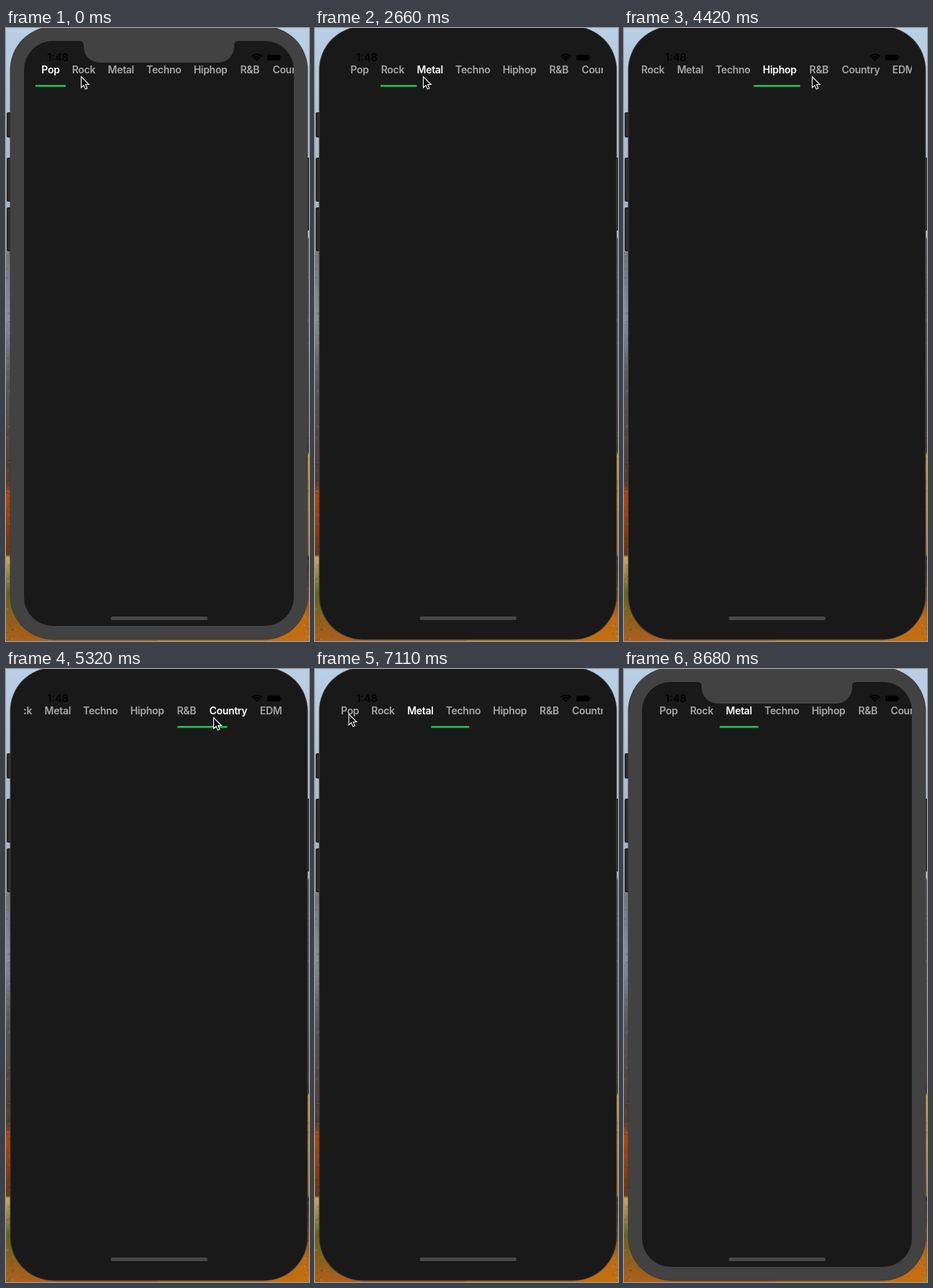
Recreate the animation shown at these times as an HTML page with a canvas. Size 421 by 851 pixels, loop 8.78 s.

```html
<!DOCTYPE html>
<html lang="en">
<head>
<meta charset="utf-8">
<title>Scrolling tab bar</title>
<style>
  html, body { margin: 0; width: 100%; height: 100%; overflow: hidden; background: #191919; }
  canvas { display: block; width: 421px; height: 851px; }
</style>
</head>
<body>
<canvas id="stage" width="421" height="851"></canvas>
<script>
const W = 421, H = 851, LOOP = 8780;
const ctx = document.getElementById('stage').getContext('2d');
const DARK = '#191919', BEZEL = '#424242';
const LEFT = 25, RIGHT = 400, MIDDLE = (LEFT + RIGHT) / 2, MARGIN = 16;
const GLIDE = 260;

const labels = ['Pop', 'Rock', 'Metal', 'Techno', 'Hiphop', 'R&B', 'Country', 'EDM'];
const widths = [42, 49.8, 53.9, 65.1, 64.6, 44.8, 71.2, 47.2];

let edge = LEFT + MARGIN;
const tabs = labels.map((label, i) => {
  const tab = { label, x: edge, w: widths[i], mid: edge + widths[i] / 2 };
  edge += widths[i];
  return tab;
});
const maxScroll = edge + MARGIN - RIGHT;

// The pointer reaches x, rests, then taps the tab.
const visits = [
  { tab: 1, x: 104, reach: 0, tap: 1560 },
  { tab: 2, x: 150, reach: 2340, tap: 2620 },
  { tab: 3, x: 216, reach: 3230, tap: 3522 },
  { tab: 4, x: 261, reach: 3680, tap: 4180 },
  { tab: 6, x: 288, reach: 5160, tap: 5205 },
  { tab: 7, x: 352, reach: 5750, tap: 6030 },
  { tab: 2, x: 46.5, y: 62, reach: 6640, tap: 6915 }
];
const exit = { x: 480, y: 900, reach: 7820 };

const lerp = (a, b, p) => a + (b - a) * p;
const clamp = (v, lo, hi) => Math.min(hi, Math.max(lo, v));
const smooth = p => p * p * (3 - 2 * p);

const sample = clock => Math.max(0, Math.floor((clock + 20) / 148) * 148 - 20);

// Overdamped spring from 0 to 1
function spring(ms) {
  const s = ms / 1000, slow = 12.5, fast = 93.5;
  const p = 1 - (fast * Math.exp(-slow * s) - slow * Math.exp(-fast * s)) / (fast - slow);
  return p > 0.996 ? 1 : p;
}

function tabState(t) {
  let active = tabs[0], { x, w } = active, scroll = 0;
  for (const visit of visits) {
    if (t < visit.tap) break;
    const p = spring(t - visit.tap);
    active = tabs[visit.tab];
    x = lerp(x, active.x, p);
    w = lerp(w, active.w, p);
    scroll = lerp(scroll, clamp(active.mid - MIDDLE, 0, maxScroll), p);
  }
  return { active, x, w, scroll };
}

function pointerAt(t) {
  let { x } = visits[0], y = 67;
  for (const stop of [...visits, exit]) {
    const p = smooth(clamp((t - stop.reach) / GLIDE + 1, 0, 1));
    x = lerp(x, stop.x, p);
    y = lerp(y, stop.y || 67, p);
  }
  return { x, y };
}

function roundRect(c, x, y, w, h, r, fill) {
  c.beginPath();
  c.roundRect(x, y, w, h, r);
  c.fillStyle = fill;
  c.fill();
}

function paintStrip(c, x, stops) {
  const g = c.createLinearGradient(0, 0, 0, H);
  for (const [y, color] of stops) g.addColorStop(y / H, color);
  c.fillStyle = g;
  c.fillRect(x, 0, W / 2, H);
}

function makeBackdrop() {
  const cv = document.createElement('canvas');
  cv.width = W;
  cv.height = H;
  const c = cv.getContext('2d');
  // Sky, rock and autumn trees
  paintStrip(c, 0, [
    [0, '#b9cfe6'], [308, '#a3adb8'], [312, '#73757d'], [400, '#8a8e9c'], [500, '#54555b'],
    [630, '#553a2e'], [650, '#b0470f'], [731, '#6a3510'], [735, '#c9a560'], [785, '#66621c'],
    [851, '#ad5f1c']
  ]);
  paintStrip(c, W / 2, [
    [0, '#b9cfe6'], [290, '#c0c5c9'], [293, '#62636a'], [455, '#57575d'], [588, '#4c3d39'],
    [592, '#e5a318'], [731, '#b8741a'], [735, '#3d2c18'], [820, '#bd6a14'], [851, '#c4700f']
  ]);

  let seed = 7;
  const rnd = () => (seed = seed * 16807 % 2147483647) / 2147483647;
  for (let i = 0; i < 700; i++) {
    const x = rnd() * (i % 2 ? 8 : 60), y = lerp(312, H, rnd());
    c.fillStyle = rnd() < 0.6 ? '#2a1a10' : '#ffd9a0';
    c.globalAlpha = rnd() * 0.18;
    c.fillRect(rnd() < 0.5 ? x : W - x, y, 3, 2);
  }
  c.globalAlpha = 1;

  const button = (x, y, h) => {
    roundRect(c, x, y, 9, h, 2, '#161617');
    roundRect(c, x + 1, y + 1, 7, h - 2, 1.5, '#2b2b2d');
  };
  button(1, 117, 35);
  button(1, 180, 61);
  button(1, 249, 61);
  button(414, 180, 101);
  return cv;
}

function drawNotch() {
  const l = 108, r = 317, top = 18, bottom = 48;
  ctx.beginPath();
  ctx.moveTo(l - 6, top - 1);
  ctx.lineTo(l - 6, top);
  ctx.quadraticCurveTo(l, top, l, top + 6);
  ctx.arcTo(l, bottom, l + 22, bottom, 22);
  ctx.arcTo(r, bottom, r, top, 22);
  ctx.lineTo(r, top + 6);
  ctx.quadraticCurveTo(r, top, r + 6, top);
  ctx.lineTo(r + 6, top - 1);
  ctx.fillStyle = BEZEL;
  ctx.fill();
}

function drawPhone(bezel) {
  roundRect(ctx, 5.5, -2.5, 414, 852, 61, '#3c3c3c');
  roundRect(ctx, 6.5, -1.5, 412, 850, 60, bezel ? BEZEL : DARK);
  if (bezel) {
    roundRect(ctx, LEFT, 18, RIGHT - LEFT, 812, 40, DARK);
    drawNotch();
  }
  roundRect(ctx, 145.5, 817, 134.5, 5, 2.5, '#484848');
}

function drawStatus() {
  ctx.fillStyle = ctx.strokeStyle = '#000';
  ctx.font = '600 14.5px Inter, sans-serif';
  ctx.textAlign = 'center';
  ctx.letterSpacing = '0px';
  ctx.fillText('1:48', 72, 46);

  const wifi = r => ctx.arc(348.5, 46, r, -Math.PI * 0.76, -Math.PI * 0.24);
  ctx.lineWidth = 2.3;
  for (const r of [5.9, 9.4]) {
    ctx.beginPath();
    wifi(r);
    ctx.stroke();
  }
  ctx.beginPath();
  ctx.moveTo(348.5, 46);
  wifi(3.6);
  ctx.fill();
  roundRect(ctx, 363, 37, 18, 8, 2, '#000');
  roundRect(ctx, 381.5, 39.5, 1.2, 3, 0.6, '#000');
}

function drawTabs({ active, x, w, scroll }) {
  ctx.save();
  ctx.beginPath();
  ctx.rect(LEFT, 49, RIGHT - LEFT, 36);
  ctx.clip();
  ctx.translate(-scroll, 0);
  ctx.font = '600 14px Inter, sans-serif';
  ctx.letterSpacing = '-0.3px';
  ctx.textAlign = 'center';
  for (const tab of tabs) {
    ctx.fillStyle = tab === active ? '#fff' : '#a7a7ab';
    ctx.fillText(tab.label, tab.mid, 63);
  }
  ctx.fillStyle = '#1db954';
  ctx.fillRect(x, 79, w, 2.8);
  ctx.restore();
}

function drawPointer({ x, y }) {
  ctx.save();
  ctx.translate(x + 0.5, y + 0.5);
  const arrow = new Path2D('M0 0V15.2L3.5 12L5.8 17.4L8.4 16.3L6.1 11H10.8Z');
  ctx.fillStyle = '#050505';
  ctx.fill(arrow);
  ctx.strokeStyle = '#fff';
  ctx.lineWidth = 1.1;
  ctx.stroke(arrow);
  ctx.restore();
}

const backdrop = makeBackdrop();

function draw(clock) {
  const t = sample(clock);
  ctx.drawImage(backdrop, 0, 0);
  drawPhone(clock < 1470 || clock >= 8680);
  drawStatus();
  drawTabs(tabState(t));
  drawPointer(pointerAt(t));
}

const begin = performance.now();
function loop() {
  draw((performance.now() - begin) % LOOP);
  requestAnimationFrame(loop);
}
loop();
</script>
</body>
</html>
```
